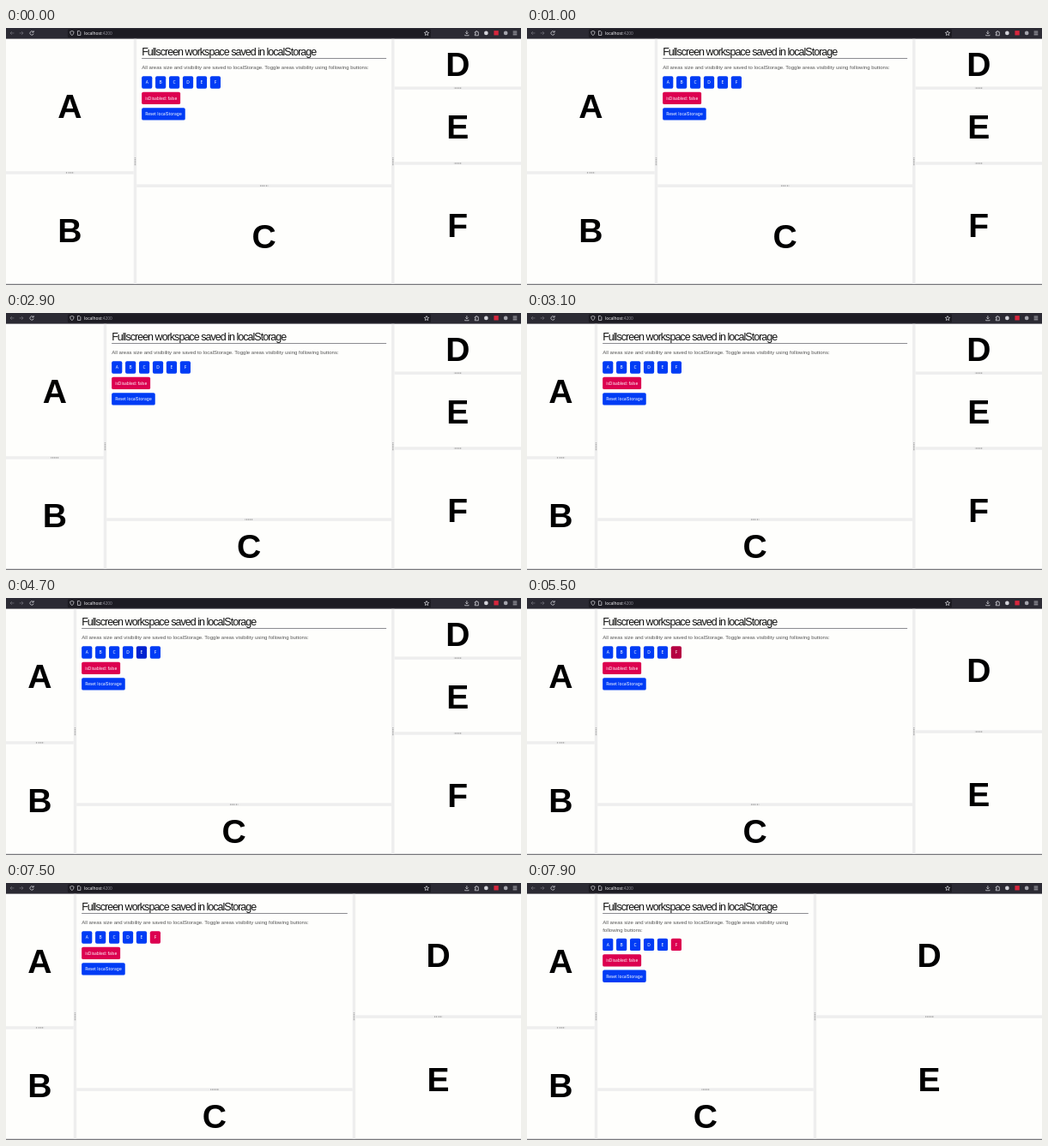
An HTML page that plays this animation: 600x300 px, repeating every 8 s.

```html
<!DOCTYPE html>
<html lang="en">
<head>
<meta charset="utf-8">
<title>Split workspace</title>
<style>
  html, body { margin: 0; width: 100%; height: 100%; overflow: hidden; background: #fefefc; }
  /* The desktop is laid out at 1920 x 960 and shown at 600 x 300. */
  #desktop {
    position: absolute; width: 1920px; height: 960px; overflow: hidden;
    transform: scale(.3125); transform-origin: 0 0;
    font-family: "Liberation Sans", Arial, sans-serif; background: #fefefc;
  }
  #desktop > * { position: absolute; box-sizing: border-box; }
  #toolbar { left: 0; top: 0; width: 1920px; height: 41px; }
  #toolbar text { font: 15.6px "Noto Sans", sans-serif; }
  #bottom { left: 0; top: 956px; width: 1920px; height: 4px; background: #77777c; }

  .area {
    display: flex; align-items: center; justify-content: center; overflow: hidden;
    padding-top: 8px; font-size: 125px; font-weight: bold; color: #000;
  }
  .gutter { display: flex; align-items: center; justify-content: center; background: #eee; }
  .gutter::after {
    content: ""; width: 30px; height: 5px;
    background: repeating-linear-gradient(90deg, #aaa 0 3px, #ddd 3px 6px);
  }
  .gutter.upright::after {
    width: 5px; height: 30px;
    background: repeating-linear-gradient(#aaa 0 3px, #ddd 3px 6px);
  }

  #main { padding: 23px 19px 0; overflow: hidden; }
  h1 {
    margin: 0; border-bottom: 3px solid #85858a; white-space: nowrap;
    font-size: 40px; font-weight: normal; line-height: 48px; letter-spacing: -3.1px; color: #111;
  }
  p { margin: 20px 0 18px; font-size: 19.3px; line-height: 27px; color: #555; }
  .row { display: flex; gap: 12px; margin-bottom: 13px; }
  .button {
    height: 46px; padding: 0 13px; border-radius: 6px; background: #003cf5; color: #fff;
    font: 15.7px/46px "Noto Sans", sans-serif; white-space: nowrap;
  }
  .toggle { width: 39px; padding: 0; text-align: center; }
  .off { background: #dc0050; }
</style>
</head>
<body>
<div id="desktop">
  <svg id="toolbar" viewBox="0 0 1920 41">
    <rect width="1920" height="41" fill="#2b2a33"/>
    <rect x="230" y="4" width="1354" height="32" rx="5" fill="#1c1b22"/>
    <g fill="none" stroke="#e4e4ea" stroke-width="2.2">
      <g stroke="#77767f">
        <path d="M30 19H16m6-6-6 6 6 6"/>
        <path d="M50 19h14m-6-6 6 6-6 6"/>
      </g>
      <path d="M101 14a7 7 0 1 0 2 7m0-11v6h-6"/>
      <path d="M246 11l7 3q0 9-7 14-7-5-7-14z"/>
      <path d="M267 11h7l4 4v12h-11z"/>
      <path d="M1568 11l2.5 5.5 6 .7-4.500 4 1.200 6-5.200-3-5.200 3 1.200-6-4.500-4 6-.7z"/>
      <path d="M1718 10v12m-5-5 5 5 5-5m-12 8v3h14v-3"/>
      <path d="M1748 15h4v-3h5v3h4v13h-13v-4h3v-5h-3z"/>
      <path d="M1890 13h15m-15 6h15m-15 6h15"/>
    </g>
    <circle cx="1790" cy="19" r="7.500" fill="#d4d4da"/>
    <rect x="1819" y="10" width="17" height="17" fill="#d7263d"/>
    <circle cx="1863" cy="19" r="7.500" fill="#a5a5ad"/>
    <text x="291" y="25" fill="#f4f4f8">localhost<tspan fill="#8f8e98">:4200</tspan></text>
  </svg>
  <div id="main">
    <h1>Fullscreen workspace saved in localStorage</h1>
    <p>All areas size and visibility are saved to localStorage. Toggle areas visibility using following buttons:</p>
    <div class="row" id="toggles"></div>
    <div class="row"><div class="button off">isDisabled: false</div></div>
    <div class="row"><div class="button">Reset localStorage</div></div>
  </div>
  <div id="bottom"></div>
</div>
<script>
const LOOP = 8000, STEP = 100;
const TOP = 41, BOTTOM = 956, RIGHT = 1920, GUTTER = 11;
const BLUE = ['#003cf5', '#0022d0'], RED = ['#dc0050', '#b50042'];
const desktop = document.getElementById('desktop');
const main = document.getElementById('main');

function add(parent, className, text = '') {
  const el = document.createElement('div');
  el.className = className;
  el.textContent = text;
  return parent.appendChild(el);
}

const areas = {}, toggles = {};
for (const name of 'ABCDEF') {
  areas[name] = add(desktop, 'area', name);
  toggles[name] = add(document.getElementById('toggles'), 'button toggle', name);
}
const upright = [0, 1].map(() => add(desktop, 'gutter upright'));
const level = [0, 1, 2, 3].map(() => add(desktop, 'gutter'));

function place(el, left, top, right, bottom) {
  Object.assign(el.style, {
    left: left + 'px', top: top + 'px',
    width: right - left + 'px', height: bottom - top + 'px'
  });
}

// Stacks panes in one column, with a gutter at each cut.
function column(left, right, panes, cuts, gutters) {
  let top = TOP;
  panes.forEach((pane, i) => {
    const last = i === cuts.length;
    place(pane, left, top, right, last ? BOTTOM : cuts[i]);
    if (last) return;
    place(gutters[i], left, cuts[i], right, cuts[i] + GUTTER);
    top = cuts[i] + GUTTER;
  });
}

// Rises from 0 to 1 in whole steps.
function ramp(time, start, steps) {
  const done = Math.floor((time - start) / STEP) + 1;
  return Math.min(Math.max(done / steps, 0), 1);
}

function drag(time, start, steps, from, to) {
  const p = ramp(time, start, steps);
  return from + (to - from) * p * p * (3 - 2 * p);
}

function paint(button, [plain, dark], hover) {
  button.style.background = `color-mix(in srgb, ${dark} ${hover * 100}%, ${plain})`;
}

function render(time) {
  const leftCut = drag(time, 2800, 4, 476, 252);
  const rightCut = drag(time, 7300, 7, 1437, 1068);
  const mainCut = drag(time, 1500, 3, 584, 766);
  const hidden = time >= 5500;
  const { A, B, C, D, E, F } = areas;

  column(0, leftCut, [A, B], [535], [level[0]]);
  column(leftCut + GUTTER, rightCut, [main, C], [mainCut], [level[1]]);
  column(rightCut + GUTTER, RIGHT, hidden ? [D, E] : [D, E, F],
    hidden ? [494] : [219, 500], [level[2], level[3]]);
  for (const el of [F, level[3]]) el.style.display = hidden ? 'none' : '';
  place(upright[0], leftCut, TOP, leftCut + GUTTER, BOTTOM);
  place(upright[1], rightCut, TOP, rightCut + GUTTER, BOTTOM);

  paint(toggles.E, BLUE, ramp(time, 4600, 2) - ramp(time, 4900, 2));
  paint(toggles.F, hidden ? RED : BLUE, ramp(time, 5000, 2) - ramp(time, 6300, 2));
}

function tick() {
  render(performance.now() % LOOP);
  requestAnimationFrame(tick);
}
tick();
</script>
</body>
</html>
```
